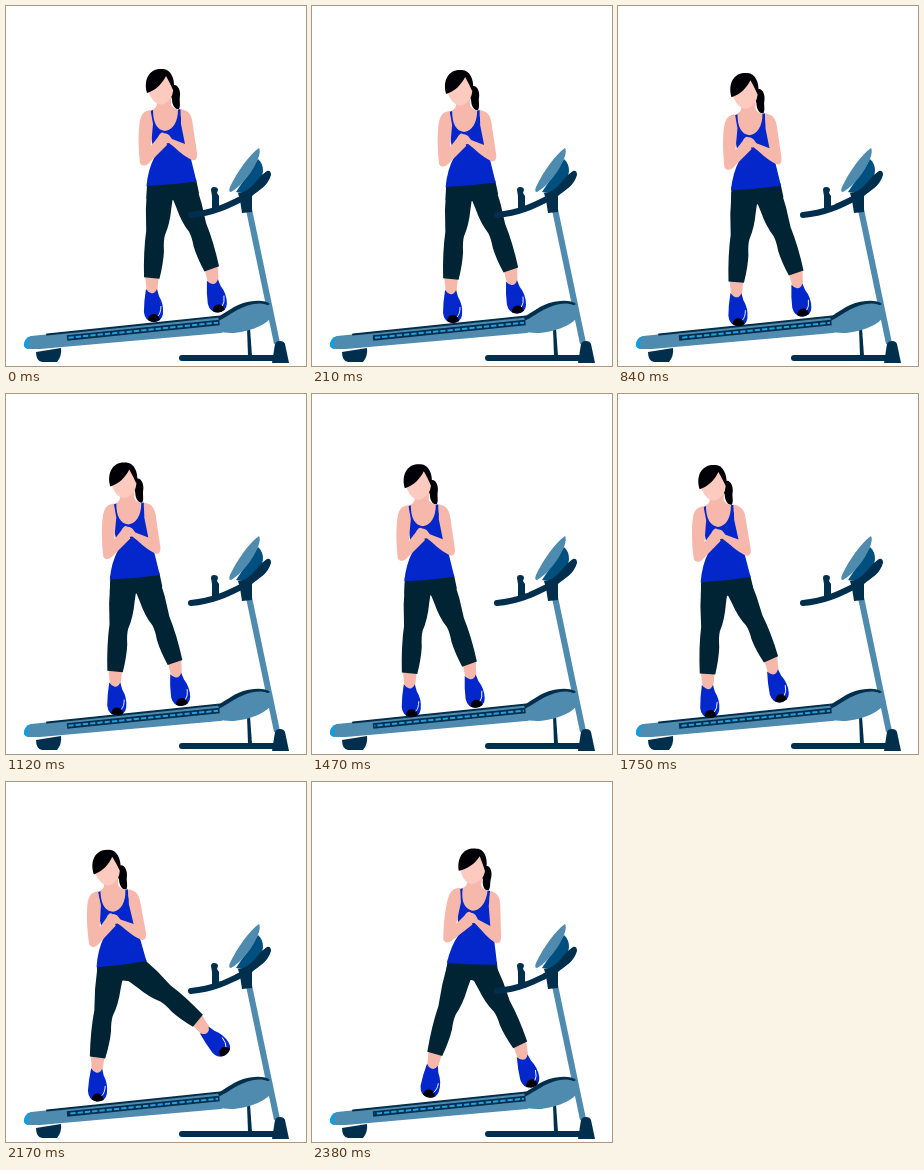
Recreate the animation shown at these times as an HTML page. Size 300x360 px, loop 2.45 s.

```html
<!DOCTYPE html>
<html lang="en">
<head>
<meta charset="utf-8">
<title>Treadmill side step</title>
<style>
  html, body { margin: 0; height: 100%; overflow: hidden; background: #fff; }
  svg { display: block; width: 100vw; height: 100vh; }
  .steel { fill: #4f8bae; }
  .navy { fill: #002f4d; }
  .skin { fill: #f6b8ab; }
  .face { fill: #fccabf; }
  .blue { fill: #0427cb; }
  .dark { fill: #002433; }
  .hair { fill: #000006; }
  .line { fill: none; stroke: #002f4d; stroke-linecap: round; }
</style>
</head>
<body>
<svg viewBox="0 0 300 360">
  <defs>
    <path id="leg" class="dark" d="M-13 0Q-13 22-10 43Q-11 64-8 90H7.500Q10 74 9.500 62Q8 52 9 46Q13 34 13 18L14 0Z"/>
    <g id="foot">
      <path class="skin" d="M-7-3H7L5 16H-5Z"/>
      <path class="blue" d="M-6 11Q-8 23-8 34Q-7 43 1 44Q10 44 11 36Q12 26 7 18L5 11Q3 16-1 15Q-4 14-6 11Z"/>
      <path class="hair" d="M-4 42Q-3 36 2 36Q7 36 8 42Q2 46-4 42Z"/>
      <path fill="none" stroke="#fff" stroke-width=".9" d="M9 28Q9 35 6 38"/>
    </g>
  </defs>

  <!-- treadmill -->
  <path class="navy" d="M241 322H244L246 350H242Z"/>
  <path class="line" stroke-width="6" d="M176 352H272"/>
  <path class="steel" d="M240 204L246 203L274 337L268 338Z"/>
  <path class="navy" d="M266 357L269 338Q270 335 274 335Q278 335 279 338L283 357Z"/>
  <path class="navy" d="M30 346L55 342Q56 350 51 356H36Q30 355 30 346Z"/>
  <path class="steel" d="M25 330L215 311L232 320L215 327L34 343H24Q18 343 18 339Q18 332 25 330Z"/>
  <path fill="#0c9fe2" d="M25 330Q18 333 18 340Q20 343 23 343Q20 337 25 330Z"/>
  <path class="line" stroke-width="2" d="M41 328.500L214 310.500"/>
  <path class="navy" d="M212 311C224 304 232 296 248 295Q259 294 264 298L240 312L214 318Z"/>
  <path class="steel" d="M204 318C220 314 228 302 248 298C259 296 267 300 267 307C265 317 247 325 228 327Q210 328 204 318Z"/>
  <path class="line" style="stroke-linecap:butt" stroke-width="5.500" d="M61 332L213.500 316.500"/>
  <path id="belt" fill="none" stroke="#22a0e0" stroke-width="2" stroke-dasharray="5.300 2" d="M62.500 331.800L212 316.700"/>
  <path class="navy" d="M205 184Q205 181 208 181Q212 181 212 184L211 187L213 190V202L206 204V190Z"/>

  <!-- woman -->
  <use id="footL" href="#foot"/>
  <use id="footR" href="#foot"/>
  <use id="legL" href="#leg"/>
  <use id="legR" href="#leg"/>
  <g id="torso">
    <path class="dark" d="M141 176L190 173L193 187Q182 198 167 194Q153 198 140.500 193Z"/>
    <path class="hair" d="M165 81C170 75 175 83 174 90C173 95 175 99 173 103C169 104 166 99 166 93C164 89 164 85 165 81Z"/>
    <path class="skin" d="M150 92L165 88V99Q168 104 177 104L175 126H146L143 105Q151 103 151 97Z"/>
    <path class="face" d="M142 84L160 69L167 80Q168 90 162 95Q157 100 152 98Q145 95 142 84Z"/>
    <path class="hair" d="M141 87C137 73 144 62 156 63C164 62 169 72 168 82L167 84Q164 77 160 70C156 78 150 84 141 87Z"/>
    <path class="blue" d="M144.500 105L147 104C147 117 151 124 159 125C167 124 172 116 172 103.500L174.500 103Q174 115 179 124Q181 136 184 149L190.500 175.500Q166 179 140.500 180Q142 163 149 150L146 136Q144 126 146 120Z"/>
    <path class="skin" d="M144.500 104C135 105 134 112 133 122C132 135 133 148 134 157C136 161 141 160 144 156L161 139L158 127Q155 125 152 131L145 140L147 118Z"/>
    <path class="skin" d="M175 103C184 105 186 110 187 120L191 147C192 154 188 156 184 153C176 149 170 142 163 137L156 138L154 130Q158 125 163 129L166 133L179 138L175 118Z"/>
  </g>

  <!-- console, in front of her leg -->
  <path class="line" stroke-width="6" d="M185 209C209 207 225 198 239 191"/>
  <path fill="#00507f" d="M252 153C259 159 259 171 250 179Q240 189 230 186Z"/>
  <path class="steel" d="M253 142Q255 145 252 153C247 165 236 180 225 186Q222 186 224 181C231 166 243 149 253 142Z"/>
  <path class="navy" d="M232 187C246 186 250 172 261 165Q265 164 265 169C262 180 253 184 246 190L246 206L236 207L234 194Z"/>
</svg>
<script>
const LOOP = 2450, STEP = 70, BELT = 80.3, DRIFT = 1680;
const $ = id => document.getElementById(id);
const place = (id, transform) => $(id).setAttribute('transform', transform);
const mix = (a, b, k) => a.map((v, i) => v + (b[i] - v) * k);
const smooth = k => k * k * (3 - 2 * k);

// pelvis x y, torso tilt, left ankle x y, right ankle x y
const stand = [165, 178, 0, 146, 272, 205.5, 263];
const kick = [83, 182, -9, 79.5, 278, 173, 216];
const land = [147, 183, 5, 104, 273, 210.5, 262];
const settle = [159.5, 182, 7, 123, 272, 208, 263];

// ride the belt down and left
const ride = t => {
  const dx = -BELT * t / LOOP, dy = -dx * .15;
  return stand.map((v, i) => i === 2 ? v : v + ([0, 3, 5].includes(i) ? dx : dy));
};

const moves = [
  { until: 2030, from: ride(DRIFT), to: kick, ease: smooth },
  { until: 2310, from: kick, to: land },
  { until: 2380, from: land, to: settle },
  { until: LOOP, from: settle, to: stand }
];

function poseAt(t) {
  if (t < DRIFT) return ride(t);
  const i = moves.findIndex(m => t < m.until);
  const { until, from, to, ease = k => k } = moves[i];
  const begin = i ? moves[i - 1].until : DRIFT;
  return mix(from, to, ease((t - begin) / (until - begin)));
}

// the leg spans hip to ankle, the foot follows it with some turnout
function drawLeg(side, [hx, hy], [ax, ay], mirror, turn) {
  const dx = ax - hx, dy = ay - hy;
  const angle = -Math.atan2(dx, dy) * 180 / Math.PI;
  place('leg' + side, `translate(${hx} ${hy}) rotate(${angle}) scale(${mirror} ${Math.hypot(dx, dy) / 90})`);
  place('foot' + side, `translate(${ax} ${ay}) rotate(${angle + turn})`);
}

function draw(t) {
  const [x, y, tilt, lx, ly, rx, ry] = poseAt(t);
  const r = tilt * Math.PI / 180, c = Math.cos(r), s = Math.sin(r);
  const hip = (dx, dy) => [x + dx * c - dy * s, y + dx * s + dy * c];
  drawLeg('L', hip(-11, 5), [lx, ly], 1, -5);
  drawLeg('R', hip(12, 3), [rx, ry], -1, 12);
  place('torso', `translate(${x} ${y}) rotate(${tilt}) translate(-165 -178)`);
  $('belt').setAttribute('stroke-dashoffset', BELT * t / LOOP);
}

const start = performance.now();
function tick() {
  const t = (performance.now() - start) % LOOP;
  draw(Math.floor(t / STEP) * STEP);
  requestAnimationFrame(tick);
}
tick();
</script>
</body>
</html>
```
